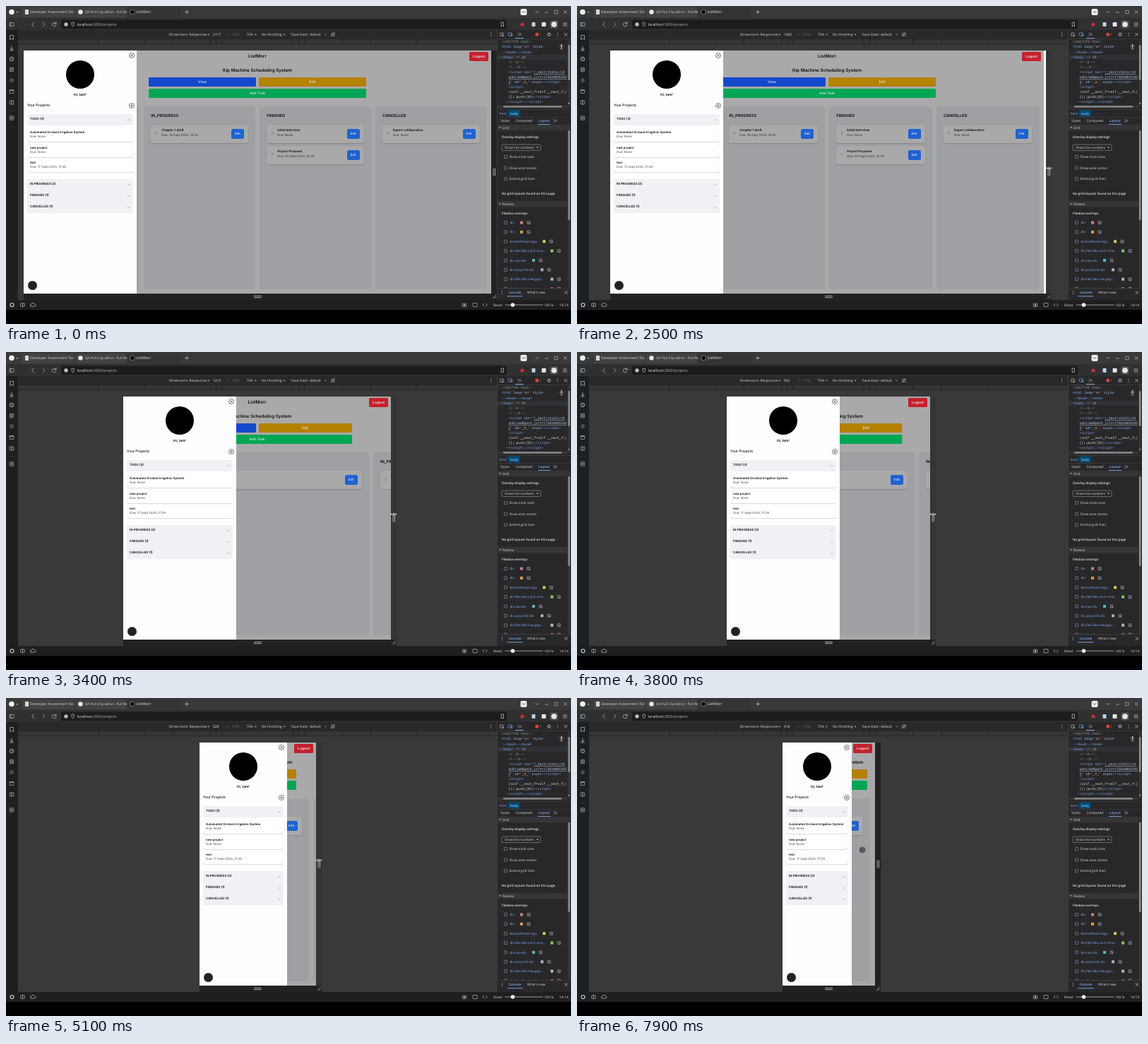
These frames come from a looping animation (800x450 px, 8000 ms). An HTML page:

```html
<!DOCTYPE html>
<html lang="en">
<head>
<meta charset="utf-8">
<title>Responsive resize</title>
<style>
html, body { margin: 0; width: 100%; height: 100%; overflow: hidden; background: #000; }
#stage { position: relative; width: 800px; height: 450px; overflow: hidden; }
svg { position: absolute; text-rendering: geometricPrecision; }
#stage > svg { left: 0; top: 0; }
svg text { white-space: pre; }
.page { position: absolute; top: 63px; height: 344px; overflow: hidden; background: #a9a9aa;
  font: 4.4px Inter, sans-serif; color: #0b0b0d; text-rendering: geometricPrecision; }
.page div { position: absolute; box-sizing: border-box; white-space: nowrap; }
.page .inner { left: 0; right: 0; top: -63px; height: 450px; }
.mid { transform: translateY(-50%); line-height: 1.2; }
.center { left: 50%; transform: translate(-50%, -50%); }
.btn { display: flex; align-items: center; justify-content: center; color: #e4e6ea; border-radius: 1.5px; font-size: 5px; font-weight: 500; }
.cols { left: 6.5px; right: 6.5px; top: 142px; height: 259px; display: flex; gap: 6.25px; }
.page .col { position: relative; flex: 1 0 0; background: #9fa0a3; border-radius: 4px; }
.narrow .col { flex: 0 0 calc(var(--w) * .9); }
.card { left: 10px; right: 10px; height: 26px; background: #a9a9aa; border-radius: 3px; box-shadow: 0 .6px 1.4px #0004; overflow: hidden; }
.card .btn { right: 6px; top: 6px; width: 18px; height: 14px; background: #1f62d0; border-radius: 2.5px; font-size: 4.4px; }
.side { left: 0; top: 63px; height: 344px; background: #fefefe; overflow: hidden; }
.bar { left: 5px; right: 5px; background: #f0f1f5; border-radius: 1.5px; }
.item { left: 5.5px; right: 5.5px; height: 18px; background: #fff; border-radius: 2px; box-shadow: 0 0 .6px #0005, 0 .7px 1px #0003; }
.dot { border-radius: 50%; }
</style>
</head>
<body>
<div id="stage"></div>
<script>
const SANS = '"Open Sans", sans-serif', MONO = '"Noto Sans Mono", monospace';
const LOOP = 8000, STEP = 100, SCALE = 0.3125, CENTER = 356;
const stage = document.getElementById('stage');

// ---- SVG helpers ----
const rect = (x, y, w, h, fill, r = 0, extra = '') =>
  `<rect x="${x}" y="${y}" width="${w}" height="${h}" fill="${fill}" rx="${r}" ${extra}/>`;
const circle = (x, y, r, fill, extra = '') => `<circle cx="${x}" cy="${y}" r="${r}" fill="${fill}" ${extra}/>`;
const line = (d, color = '#c8c8c8', w = 0.7) =>
  `<path d="${d}" fill="none" stroke="${color}" stroke-width="${w}" stroke-linecap="round" stroke-linejoin="round"/>`;
const frame = (x, y, w, h, color = '#c8c8c8', r = 0.4) =>
  rect(x - w / 2, y - h / 2, w, h, 'none', r, `stroke="${color}" stroke-width=".6"`);
const esc = s => s.replace(/&/g, '&amp;').replace(/</g, '&lt;');
const text = (x, y, s, size = 4.8, fill = '#d8d8d8', weight = 400, font = SANS, id = '') =>
  `<text x="${x}" y="${y + size * 0.35}" font-size="${size}" fill="${fill}" font-weight="${weight}" font-family='${font}' ${id && `id="${id}"`}>${s}</text>`;
const label = (x, y, s, ...rest) => text(x, y, esc(s), ...rest);
const down = (x, y, c = '#c8c8c8') => `<path d="M${x - 1.4} ${y - 0.8}h2.8l-1.4 1.9z" fill="${c}"/>`;
const dots = (x, y) => [-2, 0, 2].map(d => circle(x, y + d, 0.55, '#c8c8c8')).join('');
const cross = (x, y, r = 2) => line(`M${x - r} ${y - r}l${2 * r} ${2 * r}M${x + r} ${y - r}l${-2 * r} ${2 * r}`);
const more = (x, y) => line(`M${x - 2} ${y - 1.8}l1.8 1.8l-1.8 1.8M${x + 0.6} ${y - 1.8}l1.8 1.8l-1.8 1.8`);

function browser() {
  let s = rect(0, 0, 800, 430, '#1f1f20') + rect(0, 0, 800, 17, '#39393a') + rect(0, 17, 800, 17, '#303031') +
    rect(23, 2, 73, 14, '#424243', 2) + rect(98, 2, 72, 14, '#424243', 2) + rect(172, 2, 75, 16, '#343435', 2) +
    rect(78, 19.5, 631, 13, '#1c1c1d', 2);
  s += circle(8, 8.5, 3.8, '#f0f0f0') + down(16, 9);
  s += rect(27, 5, 5, 7, '#d8d8d8', 0.6) + label(34, 8.5, 'Developer Assessment Tas', 5);
  s += circle(105.5, 8.5, 3.2, '#e8e8e8') + label(112, 8.5, 'QA Pull 2 by oBrun · Pull Re', 4.7);
  s += circle(179, 8.5, 3.4, '#050505', 'stroke="#ddd" stroke-width=".5"') + label(184.5, 8.5, 'ListMorr', 5.3, '#f0f0f0');
  s += line('M253.5 8.5h5M256 6v5') + rect(728.5, 4, 9, 9, '#eee', 2) + line('M731 7.5l2 2l2-2', '#222');
  s += line('M750 7.5l2 2l2-2M763.5 9h4') + frame(779, 8.5, 4.5, 4.5) + cross(792, 8.5);

  // navigation row
  s += frame(8, 26, 6, 5) + line('M6.8 23.8v4.6') + line('M39.5 23l-3 3l3 3') + line('M52 23l3 3l-3 3', '#aaa');
  s += line('M70.8 25a2.8 2.8 0 1 0 0 2.3M71 22.8v2.3h-2.3') + circle(85, 26, 2.7, '#bbb') +
    line('M93 23.8l1.8-.8l1.8.8c0 3-.6 4.4-1.8 5.2c-1.2-.8-1.8-2.2-1.8-5.2');
  s += text(100.5, 26, 'localhost<tspan fill="#bbb">:3000/projects</tspan>', 5.2, '#eee');
  s += line('M701.5 23h3v6l-1.5-1.3l-1.5 1.3z') + circle(731, 26, 2.6, '#c62f38') + rect(744.5, 23, 5, 6, '#b9d2ea', 1);
  s += rect(758.5, 23, 6, 6, '#e6e6e6', 1) + rect(770.5, 20.5, 11, 11, '#555', 2) + circle(776, 26, 3.8, '#e8e8e8') + line('M789 24h5M789 26h5M789 28h5');

  // side rail
  s += line('M6 41.5h4.5v6l-2.2-1.5l-2.3 1.5z') + line('M8 57v5M6 60l2 2l2-2M5.5 63h5');
  s += circle(8, 75, 2.8, 'none', 'stroke="#c8c8c8" stroke-width=".8"') + line('M8 73.5v1.5l1 1');
  s += frame(8, 90, 4.8, 5.5) + line('M6.5 89h3M6.5 91h3') + line('M6 107.5l4-4M8.5 107.5l2-2M5.5 105l3-2.5');
  s += frame(8, 121, 5.5, 5) + line('M5.5 119.5h5') + frame(8, 136.5, 5.5, 5) + line('M8 134v5');
  s += frame(8, 158.5, 5.5, 5.5) + line('M6.5 158.5h3M8 157v3') + line('M4 148h8', '#444', 0.5);

  // status bar
  s += rect(0, 430, 800, 20, '#000') + circle(8.5, 423, 2.5, 'none', 'stroke="#c8c8c8" stroke-width="1.2"');
  s += frame(23.5, 423, 5.5, 4.5) + line('M23.5 421v4') + line('M36 425h4.5a1.6 1.6 0 0 0 0-3.2a2.4 2.4 0 0 0-4.5 0a1.6 1.6 0 0 0 0 3.2');
  s += frame(649, 423.2, 5.5, 4.5) + circle(649, 423.2, 1.2, '#c8c8c8') + frame(664, 423, 6, 5);
  s += line('M676.8 421.3l-1.7 1.7l1.7 1.7M679.6 421.3l1.7 1.7l-1.7 1.7') + label(690, 423, 'Reset');
  s += line('M707 423h53', '#999', 1) + circle(717.5, 423, 2.8, '#eee') + label(762, 423, '100 %') + label(783.5, 423, '14:14', 5, '#d8d8d8', 400, SANS, 'clock');
  return s;
}

function deviceArea() {
  let s = rect(17, 34, 678, 382, '#39393a') + rect(17, 34, 678, 12.5, '#29292a') + rect(17, 46.5, 678, 7.5, '#353536');
  [320, 375, 425, 768, 1024, 1440].forEach(w => [-1, 1].forEach(d =>
    s += rect(CENTER + d * w * SCALE / 2 - 0.4, 46.5, 0.8, 7.5, '#1d1d1e')));
  s += rect(17, 46, 678, 0.7, '#1f1f20') + rect(17, 53.5, 678, 0.7, '#1f1f20');
  s += label(230.5, 40.5, 'Dimensions: Responsive') + down(287, 40.5) + label(293, 40.5, '', 4.8, '#eee', 400, SANS, 'width');
  s += label(312, 40.5, '×', 5, '#777') + label(319.5, 40.5, '1102', 4.8, '#777') + label(340.5, 40.5, '75%') + down(353.5, 40.5);
  s += label(362, 40.5, 'No throttling') + down(394, 40.5) + label(403, 40.5, "'Save-Data': default") + down(452.5, 40.5, '#888');
  s += line('M460.5 42.5l4.5-4.5') + frame(463, 40.3, 4, 4) + dots(686.5, 40.5);
  return s;
}

function devtools() {
  const BLUE = '#7cacf8', C = '#9aa09c', V = '#f29766', A = '#a8c7fa', LINK = '#c3d3ea';
  const span = (s, c, extra = '') => `<tspan fill="${c}" ${extra}>${esc(s)}</tspan>`;
  const link = s => span(s, LINK, 'text-decoration="underline"');
  const code = (x, y, s) => text(x, y, s, 4.58, BLUE, 400, MONO);
  let s = rect(695, 34, 105, 382, '#28282a') + rect(695, 34, 0.7, 382, '#444') + rect(695, 46, 105, 0.6, '#444');
  s += frame(702, 40.3, 4.5, 4.5) + line('M702 40l2.4 2.4') + frame(713.5, 40, 4.8, 4.2, BLUE) + frame(716, 41, 1.7, 3.4, BLUE) + more(727, 40.3);
  s += rect(721, 45.2, 12, 1, BLUE) + rect(749.5, 38, 4.5, 4.5, '#e0443e', 1) + label(755, 40.3, '1', 4.6, '#f08078');
  s += circle(769, 40.3, 2, 'none', 'stroke="#c8c8c8" stroke-width="1"') + dots(781, 40.3) + cross(792.5, 40.3);

  s += rect(696, 69, 99, 6.8, '#303134');
  s += code(701.5, 50.5, span('<!DOCTYPE html>', C)) + code(701.5, 57.7, esc('<html ') + span('lang', A) + '="' + span('en', V) + '" ' + span('style', A) + '>');
  s += code(704, 65, esc('▸<head>…</head>')) + code(697, 72.2, span('…', C) + esc('▾<body>') + span(' == $0', C));
  s += code(711.5, 79.4, span('<!--$-->', C)) + code(711.5, 86.6, span('<!--/$-->', C));
  s += code(711.5, 93.7, esc('<script ') + span('src', A) + '="' + link('/_next/static/ch'));
  s += code(711.5, 100.7, link('unks/webpack.js?v=175834045345'));
  s += code(711.5, 107.5, link('2') + '" ' + span('id', A) + '="' + span('_R_', V) + '" ' + span('async', A) + esc('><\/script>'));
  s += code(711.5, 114.5, esc('<script>')) + code(711.5, 121.5, span('(self.__next_f=self.__next_f||', '#ddd'));
  s += code(711.5, 128.5, span('[]).push([0])', '#ddd') + esc('<\/script>')) + code(708.5, 135.3, esc('▸<script>…<\/script>'));
  s += circle(786.5, 55, 0.9, '#ddd') + line('M784 57h5M786.5 57v2l-1.3 2.2M786.5 59l1.3 2.2', '#ddd');
  s += rect(795.5, 47, 3.5, 95, '#353536') + rect(795.8, 55, 2.8, 50, '#888', 1.3) + down(797, 138);
  s += rect(696, 140.5, 99, 4, '#353536') + rect(704, 141.3, 83, 2.2, '#909090', 1) + rect(695, 146, 105, 0.5, '#444');

  s += rect(711, 147.5, 17, 9, '#004a77', 1) + label(698.5, 152, 'html', 4.8, BLUE) + label(714, 152, 'body', 4.8, '#b9dcff');
  s += rect(695, 157, 105, 0.5, '#444') + label(700, 162.5, 'Styles') + label(721.5, 162.5, 'Computed') + label(754, 162.5, 'Layout', 4.8, BLUE, 600) + more(777.5, 162.5);
  s += rect(753, 167, 18, 1, BLUE);
  [[172, 'Grid'], [280, 'Flexbox']].forEach(([y, name]) =>
    s += rect(695.5, y - 4.2, 99.5, 8.5, '#353537') + down(699.5, y) + label(702.5, y, name));
  s += label(702, 185.5, 'Overlay display settings', 4.6, '#e3e3e3', 600) + frame(729.5, 200.3, 55, 8.5, '#999', 1.5) + label(706, 200.3, 'Show line numbers', 4.7) + down(752.5, 200.3);
  ['Show track sizes', 'Show area names', 'Extend grid lines'].forEach((t, i) => {
    const y = 213.5 + i * 15.6;
    s += frame(707.5, y, 4, 4, '#999') + label(712.5, y, t, 4.7);
  });
  s += label(702, 265.5, 'No grid layouts found on this page', 4.55, '#e3e3e3', 600) + label(702, 293.5, 'Flexbox overlays', 4.6, '#e3e3e3', 600);
  [['div', 730, '#c4847e'], ['div', 730, '#d89c4c'], ['button#next-logo', 762, '#c4d24a'], ['div.flex.flex-col.h-scre…', 773, '#84c65c'],
   ['div.nav-div', 747, '#5cb4be'], ['div.proj-info-div', 759, '#a9afb6'], ['div.flex.flex-row.gap-…', 773, '#b3b3b3'], ['div.flex.flex-row.gap-…', 773, '#d0504a']]
    .forEach(([t, x, c], i) => {
      const y = 306.5 + i * 13.35;
      s += frame(707.5, y, 4, 4, '#999') + label(713.5, y, t, 4.7, BLUE) + rect(x - 2, y - 2, 4, 4, c);
      s += frame(x + 10, y, 3.8, 3.8) + line(`M${x + 9.7} ${y - 0.3}l1.8 1.8`);
    });
  s += rect(795.5, 168, 3.5, 232, '#353536') + rect(795.8, 176, 2.8, 127, '#888', 1.3);
  s += rect(695.5, 399.5, 104.5, 16.5, '#28282a') + rect(695, 399.5, 105, 0.6, '#444') + dots(702.5, 405.5);
  s += label(711.5, 405.5, 'Console', 4.7, BLUE, 600) + label(738, 405.5, "What's new", 4.8) + cross(793, 405.5) + rect(709.5, 410.3, 22, 0.9, BLUE);
  return s;
}

// ---- page under test ----
const put = (y, s, style = '', cls = 'mid') => `<div class="${cls}" style="top:${y}px;${style}">${s}</div>`;
const icon = (y, right, s) =>
  `<svg width="10" height="10" viewBox="-5 -5 10 10" style="right:${right - 5}px;top:${y - 5}px">${s}</svg>`;
const ring = (y, d) => icon(y, 7.3, circle(0, 0, 3.5, 'none', 'stroke="#222" stroke-width=".6"') + line(d, '#222', 0.6));
const chevron = (y, dir) => icon(y, 11, line(`M-1.4 ${-0.7 * dir}l1.4 ${1.4 * dir}l1.4 ${-1.4 * dir}`, '#777', 0.5));
const taskCard = ([title, due], i) => put(26 + i * 30,
  put(9.2, title, 'left:15px;font-weight:600') + put(16, 'Due: ' + due, 'left:15px;color:#333') +
  put(13, '⠿', 'left:6px;color:#666;font-size:5px') + '<div class="btn">Edit</div>', '', 'card');
const column = ([name, ...tasks]) =>
  `<div class="col">${put(14.3, name, 'left:10px;font-size:5.6px;font-weight:600')}${tasks.map(taskCard).join('')}</div>`;

const columns = [
  ['TODO', ['Review notes', 'None']],
  ['IN_PROGRESS', ['Chapter 1 draft', '18 Sept 2025, 16:02']],
  ['FINISHED', ['Initial Interview', 'None'], ['Project Proposal', '20 Sept 2025, 16:36']],
  ['CANCELLED', ['Expert collaboration', 'None']]
];
const projects = [['Automated Orchard Irrigation System', 'None'], ['new project', 'None'], ['test', '17 Sept 2025, 17:29']];
const groups = ['IN PROGRESS (2)', 'FINISHED (1)', 'CANCELLED (1)'];

const sidebar = `<div class="side"><div class="inner">
  ${ring(69.7, 'M-1.4 -1.4l2.8 2.8M1.4 -1.4l-2.8 2.8')}
  <div class="dot center" style="top:97px;width:40px;height:40px;background:#000"></div>
  ${put(125.5, 'Hi, tam!', 'font-size:4.8px;font-weight:600', 'center')}
  ${put(141.3, 'Your Projects', 'left:5px;font-size:5px;font-weight:500')}
  ${ring(141.2, 'M-1.7 0h3.4M0 -1.7v3.4')}
  <div class="bar" style="top:153px;height:16px"></div>
  ${put(161, 'TODO (3)', 'left:9px;font-weight:600')}${chevron(161, -1)}
  ${projects.map(([name, due], i) => put(174.3 + i * 21.2,
    put(6, name, 'left:3.5px;font-weight:600;font-size:4.3px') + put(12.2, 'Due: ' + due, 'left:3.5px;color:#444'), '', 'item')).join('')}
  <div class="bar" style="top:244.5px;height:48.5px"></div>
  ${groups.map((g, i) => put(252.6 + i * 16.2, g, 'left:9px;font-weight:600') + chevron(252.6 + i * 16.2, 1)).join('')}
  <div class="dot" style="left:5.7px;top:388.5px;width:13px;height:13px;background:#222;box-shadow:inset 0 0 0 .5px #555"></div>
</div></div>`;

const pageHtml = `<div class="page"><div class="inner">
  ${put(71.3, 'ListMorr', 'font-size:6.4px;font-weight:600', 'center')}
  <div class="btn" style="right:4px;top:65px;width:27px;height:13px;background:#c5202c;font-weight:600">Logout</div>
  ${put(91, 'Kip Machine Scheduling System', 'font-size:6.3px;font-weight:600', 'center')}
  <div class="actions" style="left:50%;top:101px;height:30px;transform:translateX(-50%)">
    <div class="btn" style="left:0;right:calc(50% + 2px);height:13px;background:#1449cb">View</div>
    <div class="btn" style="left:calc(50% + 2px);right:0;height:13px;background:#b48100">Edit</div>
    <div class="btn" style="left:0;right:0;top:16.3px;height:13px;background:#00a653">Add Task</div>
  </div>
  <div class="cols">${columns.map(column).join('')}</div>
  ${sidebar}
</div></div>`;

const svg = s => `<svg width="800" height="450" viewBox="0 0 800 450">${s}</svg>`;
const bars = rect(0, 63, 9, 344, '#222223', 0, 'id="grip"') +
  `<g id="handle">${line('M-1.2 230v10M1.2 230v10', '#bdbdbd', 0.9)}</g>`;
const bottom = rect(0, 407, 10, 9, '#222223', 0, 'id="foot"') + line('M351.5 410.3h10M351.5 412.6h10', '#bdbdbd', 0.9) +
  `<g id="corner">${line('M-2 413.5l4.5-4.5M.5 413.5l2-2', '#bdbdbd')}</g>`;
const pointer = `<g id="arrows">${line('M-4 0h8M-2.8 -1.2l-1.2 1.2l1.2 1.2M2.8 -1.2l1.2 1.2l-1.2 1.2M0 -2v4', '#fff', 0.6)}</g>` +
  circle(0, 0, 4, '#5a5a5b', 'id="touch" stroke="#4a4a4b" stroke-width=".6"');

stage.innerHTML = svg(browser() + deviceArea() + bottom + bars + rect(0, 63, 4, 344, '#fafafa', 0, 'id="strip"')) +
  pageHtml + svg(devtools() + pointer);

// ---- motion ----
const widths = [[0, 2117], [2000, 2117], [2500, 1965], [2900, 1638], [3400, 1213], [3800, 922], [4300, 709],
  [4700, 634], [5100, 528], [5600, 461], [6500, 428], [7300, 418]];
const actionWidths = [[165, 108], [221, 166], [379, 268], [560, 308]];

function lerp(table, x) {
  const i = table.findIndex(p => p[0] > x);
  if (i < 0) return table[table.length - 1][1];
  if (!i) return table[0][1];
  const [a, b] = [table[i - 1], table[i]];
  return a[1] + (b[1] - a[1]) * (x - a[0]) / (b[0] - a[0]);
}

const $ = id => document.getElementById(id);
const page = stage.querySelector('.page'), side = stage.querySelector('.side'), actions = stage.querySelector('.actions');
const move = (id, x, y = 0) => $(id).setAttribute('transform', `translate(${x} ${y})`);
const show = (id, on) => { $(id).style.display = on ? '' : 'none'; };
const clamp = x => Math.min(1, Math.max(0, x));

function render(time) {
  const k = Math.floor(time / STEP), t = k * STEP;
  const css = Math.round(lerp(widths, t)), w = css * SCALE;
  // now and then the view grows ahead of the repaint
  const lag = t > 2000 && t < 5600 && k % 6 === 1 ? 3 : 0;
  const left = Math.round(CENTER - (w + lag) / 2), edge = Math.round(left + w), right = edge + lag;

  page.style.left = left + 'px';
  page.style.width = edge - left + 'px';
  page.style.setProperty('--w', w + 'px');
  page.classList.toggle('narrow', css < 1280);
  side.style.width = Math.min(160, w * 0.75) + 'px';
  actions.style.width = lerp(actionWidths, w) + 'px';

  const hover = t >= 1200 && t < 7500;
  $('grip').setAttribute('x', right);
  $('grip').setAttribute('width', Math.min(8, 695 - right));
  $('grip').setAttribute('fill', hover ? '#353536' : '#222223');
  $('strip').setAttribute('x', edge);
  $('strip').setAttribute('width', lag);
  $('foot').setAttribute('x', left);
  $('foot').setAttribute('width', right - left + 8);
  move('handle', right + 4.3);
  move('corner', right + 4);
  $('width').textContent = css;
  $('clock').textContent = t < 6000 ? '14:14' : '14:15';

  const enter = clamp((t - 1000) / 300), leave = clamp((t - 7400) / 500);
  move('arrows', right + 4 + (1 - enter) * 20, 229.5);
  move('touch', right + 4 + (404 - right - 4) * leave, 229.5 - 14.5 * leave);
  show('arrows', t >= 1000 && t < 7500);
  show('touch', t >= 7500);
}

function tick() {
  render(performance.now() % LOOP);
  requestAnimationFrame(tick);
}
tick();
</script>
</body>
</html>
```
